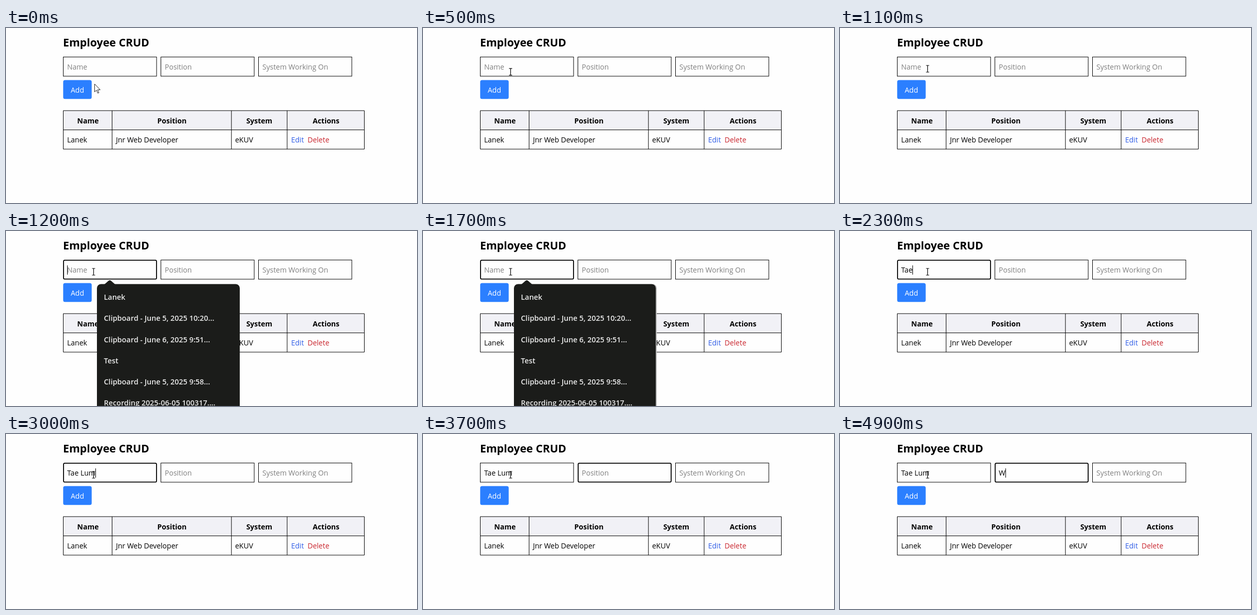
Animation of 800 by 341 pixels, one loop 5000 ms. Source, as an HTML page:

```html
<!DOCTYPE html>
<html lang="en">
<head>
<meta charset="utf-8">
<title>Employee CRUD</title>
<style>
  html, body { margin: 0; width: 100%; height: 100%; overflow: hidden; background: #fefefe; }
  svg { display: block; width: 800px; height: 341px; font: 14px "Open Sans", "Noto Sans", sans-serif; }
  text { white-space: pre; }
  .bold { font-weight: 700; }
  .mid { text-anchor: middle; }
  .hint { fill: #808080; }
  .line { fill: none; stroke: #000; }
  .menu text { fill: #ebebeb; font-size: 14.4px; font-weight: 600; }
</style>
</head>
<body>
<svg viewBox="0 0 800 341">
  <text class="bold" x="111" y="35.500" font-size="21.300">Employee CRUD</text>

  <g id="fields"></g>
  <rect id="ring" class="line" y="56.800" width="181" height="36.900" rx="2.500" stroke-width="1.800"/>
  <rect id="caret" y="67" width="1" height="18"/>

  <rect x="111.300" y="101.500" width="55.500" height="36.800" rx="3.600" fill="#2b7fff"/>
  <text class="mid" x="139" y="125.500" fill="#fff" font-weight="500">Add</text>

  <rect x="111.500" y="161" width="586" height="37.500" fill="#f1f1f6"/>
  <path class="line" d="M111.500 161h586v75h-586zM111.500 198.500h586M206.500 161v75M438.800 161v75M547.200 161v75"/>
  <g class="bold mid">
    <text x="159.500" y="185.500">Name</text>
    <text x="323" y="185.500">Position</text>
    <text x="493" y="185.500">System</text>
    <text x="623" y="185.500">Actions</text>
  </g>
  <text x="119" y="223">Lanek</text>
  <text x="214" y="223">Jnr Web Developer</text>
  <text x="446" y="223">eKUV</text>
  <text x="555" y="223" fill="#2f5de6">Edit</text>
  <text x="587" y="223" fill="#c9252d">Delete</text>

  <g id="menu" class="menu">
    <rect x="177" y="103.500" width="278" height="260" rx="8" fill="#b4b4b4"/>
    <rect id="panel" x="177" y="103.500" height="260" rx="8" fill="#1b1c1a"/>
    <path d="M191 104.500L199.500 97Q202 95 204.500 97L213 104.500z" fill="#1b1c1a"/>
  </g>

  <path id="arrow" d="M0 0V15.500L3.600 12.200L6.200 18L8.400 17L5.800 11.400H10.800z" fill="#fff" stroke="#222"/>
  <path id="beam" class="line" stroke-width="1.200" d="M-3 -6.500h2.500l.5 .5l.5 -.5h2.500M0 -6v12M-3 6.500h2.500l.5 -.5l.5 .5h2.500"/>
</svg>
<script>
const $ = id => document.getElementById(id);

function add(parent, tag, attrs, content = '') {
  const el = document.createElementNS('http://www.w3.org/2000/svg', tag);
  for (const key in attrs) el.setAttribute(key, attrs[key]);
  el.textContent = content;
  return parent.appendChild(el);
}

const show = (el, on) => el.setAttribute('visibility', on ? 'visible' : 'hidden');

const LOOP = 5000, STEP = 100, BLINK = 500;
const MENU_OPEN = 1200, MENU_CLOSE = 2300, NEXT_FIELD = 3100;

// Key times: one entry per typed character.
const fields = [
  { x: 111, hint: 'Name', value: 'Tae Lum', keys: [2200, 2300, 2300, 2400, 2600, 2700, 2800] },
  { x: 301, hint: 'Position', value: 'W', keys: [4800] },
  { x: 491, hint: 'System Working On', value: '', keys: [] }
];
for (const f of fields) {
  f.box = add($('fields'), 'rect', { class: 'line', x: f.x + .5, y: 56.5, width: 181.6, height: 37.4 });
  f.text = add($('fields'), 'text', { x: f.x + 8, y: 81 });
}

['Lanek', 'Clipboard - June 5, 2025 10:20...', 'Clipboard - June 6, 2025 9:51...',
 'Test', 'Clipboard - June 5, 2025 9:58...', 'Recording 2025-06-05 100317....']
  .forEach((label, i) => add($('menu'), 'text', { x: 190.5, y: 134 + i * 41.25 }, label));

function drawFields(t) {
  const focused = t >= MENU_OPEN;
  const field = fields[t >= NEXT_FIELD ? 1 : 0];
  for (const f of fields) {
    f.typed = f.keys.filter(k => k <= t).length;
    f.text.textContent = f.typed ? f.value.slice(0, f.typed) : f.hint;
    f.text.setAttribute('class', f.typed ? '' : 'hint');
    show(f.box, !focused || f !== field);
  }
  show($('ring'), focused);
  $('ring').setAttribute('x', field.x + 1);

  const width = field.typed ? field.text.getComputedTextLength() : 0;
  const since = Math.max(field === fields[0] ? MENU_OPEN : NEXT_FIELD, ...field.keys.filter(k => k <= t));
  show($('caret'), focused && (t - since) % (2 * BLINK) < BLINK);
  $('caret').setAttribute('x', Math.round(field.x + 8 + width));
}

function drawPointer(t) {
  const p = Math.min(1, t / 700);
  const ease = p * p * (3 - 2 * p);
  const x = 173 - 2 * ease, y = 109 - 29.5 * ease;
  const overField = y < 95;
  show($('arrow'), !overField);
  show($('beam'), overField);
  for (const id of ['arrow', 'beam'])
    $(id).setAttribute('transform', `translate(${Math.round(x) - .5} ${y.toFixed(1)})`);
}

function frame(now) {
  const t = Math.floor(now % LOOP / STEP) * STEP;
  drawFields(t);
  drawPointer(t);
  show($('menu'), t >= MENU_OPEN && t < MENU_CLOSE);
  $('panel').setAttribute('width', t > MENU_OPEN ? 276 : 278);
  requestAnimationFrame(frame);
}
requestAnimationFrame(frame);
</script>
</body>
</html>
```
